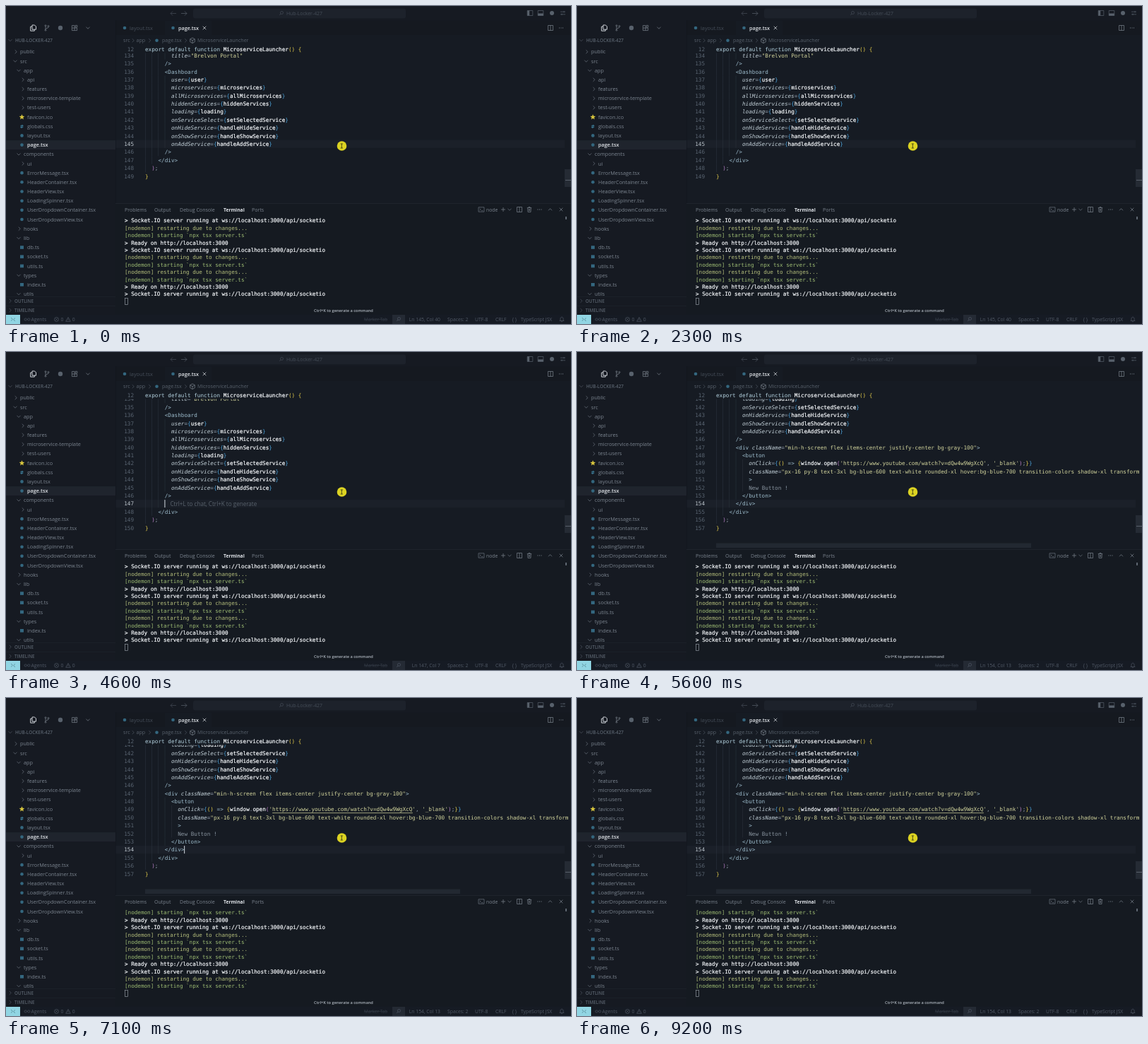
These frames come from a looping animation (800x450 px, 9300 ms). An HTML page:

```html
<!DOCTYPE html>
<html lang="en">
<head>
<meta charset="utf-8">
<title>Code editor</title>
<style>
  html, body { margin: 0; width: 100%; height: 100%; overflow: hidden; background: #161b23; }
  svg { display: block; width: 100vw; height: 100vh; }
  text { white-space: pre; font-family: "Open Sans", "Noto Sans", sans-serif; }
  .mono { font-family: "DejaVu Sans Mono", "Liberation Mono", monospace; }
  .firm { stroke: currentColor; stroke-width: .22px; }
</style>
</head>
<body>
<svg id="stage" viewBox="0 0 800 450" xmlns="http://www.w3.org/2000/svg">
  <defs><clipPath id="codeArea"><path d="M155 66.5H800V279H155Z"/></clipPath></defs>
  <g id="back"></g>
  <g id="code" clip-path="url(#codeArea)"></g>
  <g id="term"></g>
  <rect id="link" y="162.4" height=".7" fill="#d3d59d"/>
  <rect id="caret" width="1" height="11" fill="#d5dbe2"/>
  <g id="front"></g>
  <text id="position" x="615" y="446" text-anchor="end" font-size="6.8" fill="#515966"></text>
</svg>
<script>
const LOOP = 9300, MOVE = 4300, ENTER = 4400, PASTE = 4700;
const LINK = 5800, RESTART = 5900, START = 6100;
const PITCH = 4.62, CODE_X = 197, CODE_SIZE = PITCH / 0.602;
const FAINT = '#454d58', DIM = '#58616c', MID = '#7b848f', LIGHT = '#e0e4e9', BLUE = '#34677f';

const $ = id => document.getElementById(id);
const esc = s => s.replace(/&/g, '&amp;').replace(/</g, '&lt;').replace(/>/g, '&gt;');
const rect = (x, y, w, h, fill, extra = '') =>
  `<rect x="${x}" y="${y}" width="${w}" height="${h}" fill="${fill}" ${extra}/>`;
// y is the middle of the capitals
const label = (x, y, s, fill = MID, size = 7.3, extra = '') =>
  `<text x="${x}" y="${y + size * 0.357}" font-size="${size}" fill="${fill}" ${extra}>${esc(s)}</text>`;
const icon = (x, y, d, color = MID, width = 0.7) =>
  `<path transform="translate(${x} ${y})" d="${d}" fill="none" stroke="${color}" stroke-width="${width}"/>`;
const dot = (x, y, color = BLUE, r = 2.3) => `<circle cx="${x}" cy="${y}" r="${r}" fill="${color}"/>`;

const ICON = {
  right: 'M-1.3-2.5L1.3 0L-1.3 2.5',
  down: 'M-2.5-1.3L0 1.3L2.5-1.3',
  up: 'M-2.5 1.3L0-1.3L2.5 1.3',
  back: 'M4 0H-4M-1-3L-4 0L-1 3',
  forth: 'M-4 0H4M1-3L4 0L1 3',
  close: 'M-2.3-2.3L2.3 2.3M2.3-2.3L-2.3 2.3',
  plus: 'M-3 0H3M0-3V3',
  split: 'M-3.5-3.5H3.5V3.5H-3.5ZM0-3.5V3.5',
  panel: 'M-3.8-3.5H3.8V3.5H-3.8Z',
  search: 'M2.5-1A2 2 0 1 1-1.5-1A2 2 0 1 1 2.5-1M-.9.4L-2.8 2.5',
  cube: 'M0-3.8L3.3-2V2L0 3.8L-3.3 2V-2ZM-3.3-2L0 0L3.3-2M0 0V3.8',
  more: 'M-3 0H-2M-.5 0H.5M2 0H3'
};

function files() {
  // depth, kind, name; kinds: c closed, o open, x component, t script, s star, h style sheet
  const tree = `0c public|0o src|1o app|2c api|2c features|2c microservice-template|2c test-users|2s favicon.ico
2h globals.css|2x layout.tsx|2x page.tsx|1o components|2c ui|2x ErrorMessage.tsx|2x HeaderContainer.tsx
2x HeaderView.tsx|2x LoadingSpinner.tsx|2x UserDropdownContainer.tsx|2x UserDropdownView.tsx|1c hooks|1o lib
2t db.ts|2t socket.ts|2t utils.ts|1o types|2t index.ts|1o utils`.split(/[|\n]/);
  return tree.map((row, i) => {
    const depth = +row[0], kind = row[1], name = row.slice(3), y = 64.8 + i * 13.18;
    const x = 20 + depth * 5, active = name === 'page.tsx';
    const mark = {
      c: () => icon(x - 6, y, ICON.right, MID, 0.6),
      o: () => icon(x - 7, y, ICON.down, MID, 0.6),
      x: () => dot(22.5, y),
      t: () => rect(20, y - 2.3, 5, 4.6, BLUE),
      s: () => `<path transform="translate(22.5 ${y})" fill="#d7c53e" d="M0-3.8L1.1-1.2L3.8-1L1.7.8L2.4 3.5L0 2L-2.4 3.5L-1.7.8L-3.8-1L-1.1-1.2Z"/>`,
      h: () => label(20, y, '#', '#4590b0', 7.5, 'font-weight="600"')
    }[kind]();
    return (active ? rect(0, y - 6.5, 155, 13, '#1f242d') : '') + mark +
      label(x, y, name, active ? LIGHT : MID, 7.3, active ? 'font-weight="600"' : '');
  }).join('');
}

function background() {
  return rect(0, 0, 800, 450, '#161b23') +
    rect(0, 0, 800, 20.5, '#161a22') + rect(0, 20.5, 155, 417, '#161a22') +
    rect(155, 20.5, 645, 20.5, '#151920') + rect(225, 20.5, 66, 20.5, '#161b23') +
    rect(155, 20.5, 0.6, 417, '#11151b') + rect(155, 279, 645, 158, '#151a21') +
    rect(155, 279, 645, 0.6, '#252b34') + rect(0, 437, 800, 13, '#161b24');
}

function titleBar() {
  return icon(237, 10.5, ICON.back, FAINT) + icon(252, 10.5, ICON.forth, DIM) +
    rect(265, 3.5, 301, 14, '#1d222b', 'rx="3"') + icon(390, 10.5, ICON.search, FAINT) +
    label(397, 10.7, 'Hub-Locker-427', FAINT, 6.9) +
    icon(742, 10, ICON.panel, DIM) + rect(738.2, 6.5, 3, 7, DIM) +
    icon(757, 10, ICON.panel, DIM) + rect(753.2, 10.5, 7.6, 3, DIM) +
    dot(773, 10, DIM, 3) +
    icon(788.5, 10, 'M-3.5-1.8H3.5M-3.5 1.8H3.5M1.5-3V-.6M-1.5.6V3', DIM);
}

function tabs() {
  const crumb = (x, s) => label(x, 48.8, s, DIM, 7.1);
  const sep = x => icon(x, 48.8, ICON.right, DIM, 0.6);
  return icon(38.5, 31, 'M-1.5-4H2L4-2V2.2H-1.5ZM-1.5-1.8H-3.8V4.2H1.8V2.2', LIGHT, 0.9) +
    icon(58, 31, 'M-2-2V2.5M-2 1.5C-2 0 2 1 2-1.2M-3-3.2A1 1 0 1 0-1-3.2A1 1 0 1 0-3-3.2M1-2.4A1 1 0 1 0 3-2.4A1 1 0 1 0 1-2.4M-3 3.2A1 1 0 1 0-1 3.2A1 1 0 1 0-3 3.2') +
    dot(77, 31, DIM, 3.2) +
    icon(97, 31, 'M-3.6-3.4H0V3.6H-3.6ZM-3.6.1H3.6V3.6H0M1.2-3.6H3.8V-1H1.2Z') +
    icon(116, 31, ICON.down) +
    dot(168, 31) + label(175, 31.2, 'layout.tsx', FAINT) +
    dot(236.5, 31) + label(244, 31.2, 'page.tsx', LIGHT, 7.2, 'font-weight="600"') + icon(281, 31, ICON.close, LIGHT) +
    icon(771, 31, ICON.split) + icon(786, 31, ICON.more, MID, 1) +
    crumb(166, 'src') + sep(180) + crumb(184.5, 'app') + sep(203.5) + dot(213.5, 48.8) +
    crumb(221, 'page.tsx') + sep(254.5) + icon(264, 48.8, ICON.cube) + crumb(271, 'MicroserviceLauncher') +
    icon(6, 48.5, ICON.down, DIM, 0.6) + label(13, 48.7, 'HUB-LOCKER-427', DIM, 6.4, 'font-weight="600"');
}

function sidebarFoot() {
  const section = (y, s) => rect(0, y - 6.3, 155, 0.5, '#20262f') + icon(6, y, ICON.right, DIM, 0.6) +
    label(12, y, s, DIM, 6.3, 'font-weight="600"');
  return rect(0, 411, 155, 26, '#161a22') + section(417.3, 'OUTLINE') + section(430.5, 'TIMELINE');
}

function panelBar() {
  const names = [[168, 'Problems'], [210, 'Output'], [246, 'Debug Console'], [308, 'Terminal'], [348, 'Ports']];
  const y = 288;
  return names.map(([x, s]) => s === 'Terminal'
      ? label(x, y + 0.3, s, LIGHT, 6.75, 'font-weight="700"') : label(x, y + 0.3, s, MID, 7.05)).join('') +
    icon(673, y, 'M-4-3.2H4V3.2H-4ZM-2.4-1.5L-.8 0L-2.4 1.5M0 1.7H2.4', MID, 0.6) + label(680, y + 0.3, 'node', MID, 6.8) +
    icon(704, y, ICON.plus) + icon(713, y, ICON.down, MID, 0.6) + icon(727, y, ICON.split) +
    icon(741, y, 'M-3.2-2.4H3.2M-1-2.4V-3.5H1V-2.4M-2.3-2.4L-2 3.5H2L2.3-2.4M-.7-.9V2M.7-.9V2') +
    icon(755.5, y, ICON.more, MID, 1) + icon(770.5, y, ICON.up) + icon(786, y, ICON.close) +
    rect(792, 298, 2, 4, '#5d6670') +
    label(478, 430.6, 'Ctrl+K to generate a command', '#b0b8c1', 5.7, 'text-anchor="middle" font-weight="600"');
}

function statusBar() {
  const y = 443.5, color = '#515966';
  const item = (x, s) => label(x, y, s, color, 6.8);
  return rect(0, 437, 20, 13, '#91d5e3') + icon(10, y, 'M-3-2.5L-.6-.2L-3 2.1M3-2.1L.6.2L3 2.5', '#4c7f8c') +
    icon(30, y, 'M0 0C1.2-2 4-2 4 0S1.2 2 0 0S-4-2-4 0S-1.2 2 0 0', color) + item(35.5, 'Agents') +
    icon(71.5, y, 'M-3 0A3 3 0 1 0 3 0A3 3 0 1 0-3 0M-1.2-1.2L1.2 1.2M1.2-1.2L-1.2 1.2', color) + item(77.5, '0') +
    icon(88, y, 'M0-3L3.3 2.8H-3.3ZM0-1V1', color) + item(93.8, '0') +
    label(507, y, 'Marker Tab', '#343b46', 6.3, 'text-decoration="line-through"') +
    rect(547, 437, 18, 13, '#242a34') + icon(556, y, ICON.search, color) +
    item(625, 'Spaces: 2') + item(664, 'UTF-8') + item(693, 'CRLF') + item(716.5, '{ }') + item(729, 'TypeScript JSX') +
    icon(787, y, 'M-3 2H3L2 .6V-1C2-4-2-4-2-1V.6ZM-.8 3.2H.8', color);
}

// Colours one line of code; base is the bracket depth at its start.
function paint(text, base) {
  const pairs = ['#e0c94a', '#b67fc4', '#4aa0d8'];
  const parts = /=>|<\/?\w+|\/?>|"[^"]*"?|'[^']*'|\w+(?==)|[{}()]|\w+|\s+|./g;
  let depth = base;
  return [...text.matchAll(parts)].map(({ 0: s, index }) => {
    let color = '#94a1ae', style = '';
    if (/^[{(]/.test(s)) color = pairs[depth++ % 3];
    else if (/^[})]/.test(s)) color = pairs[(depth = Math.max(base, depth - 1)) % 3];
    else if (/^["']/.test(s)) color = '#d3d59d';
    else if (/^<|>$/.test(s)) color = '#9dbccc';
    else if (/^(export|default|function)$/.test(s)) color = '#b4d2df';
    else if (/^\w/.test(s)) {
      const attr = text[index + s.length] === '=', prose = base === 2 && depth === 2;
      color = attr ? '#c2d0d8' : prose ? '#89949f' : '#f0f3f6';
      style = attr ? 'font-style="italic"' : prose ? '' : `class="firm" color="${color}"`;
    }
    return `<tspan fill="${color}" ${style}>${esc(s)}</tspan>`;
  }).join('');
}

const mono = (x, y, inner, fill, size, extra = '') =>
  `<text class="mono" x="${x}" y="${y + size * 0.36}" font-size="${size}" fill="${fill}" ${extra}>${inner}</text>`;

function guides(y, indent) {
  let out = '';
  for (let col = 0; col < indent; col += 2) out += rect(CODE_X + col * PITCH, y - 5.7, 0.6, 11.4, '#2b323c');
  return out;
}

function codeLine(n, y, line, current) {
  const text = line.trimStart(), indent = line.length - text.length;
  const base = text === '}' || n === 12 ? 0 : text === ');' ? 1 : 2;
  return guides(y, indent) +
    mono(181, y, n, current ? '#bdc5cd' : '#596471', CODE_SIZE, 'text-anchor="end"') +
    mono(CODE_X + indent * PITCH, y, paint(text, base), LIGHT, CODE_SIZE);
}

const attrs = [['user', 'user'], ['microservices', 'microservices'], ['allMicroservices', 'allMicroservices'],
  ['hiddenServices', 'hiddenServices'], ['loading', 'loading'], ['onServiceSelect', 'setSelectedService'],
  ['onHideService', 'handleHideService'], ['onShowService', 'handleShowService'], ['onAddService', 'handleAddService']];
const head = ['        title="Brelvon Portal"', '      />', '      <Dashboard',
  ...attrs.map(([a, v]) => `        ${a}={${v}}`), '      />'];
const tail = ['    </div>', '  );', '}'];
const pasted = `      <div className="min-h-screen flex items-center justify-center bg-gray-100">
        <button
          onClick={() => {window.open('https://www.youtube.com/watch?v=dQw4w9WgXcQ', '_blank');}}
          className="px-16 py-8 text-3xl bg-blue-600 text-white rounded-xl hover:bg-blue-700 transition-colors shadow-xl transform
          >
          New Button !
        </button>
      </div>`.split('\n');

// top: y of line 135
const views = [
  { at: 0, extra: [], top: 81.4, line: 145, col: 40 },
  { at: MOVE, extra: [], top: 81.4, line: 146, col: 9 },
  { at: ENTER, extra: ['      '], top: 78, line: 147, col: 7 },
  { at: PASTE, extra: pasted, top: 78 - 7 * 11.385, line: 154, col: 13 }
];
const lineY = (view, n) => view.top + (n - 135) * 11.385;

function drawCode(view) {
  const y = lineY(view, view.line);
  let out = rect(155.6, y - 5.6, 635.4, 11.2, '#1b2029');
  [...head, ...view.extra, ...tail].forEach((line, i) => {
    const n = 134 + i, ly = lineY(view, n);
    if (ly > 58) out += codeLine(n, ly, line, n === view.line);
  });
  if (view.at === ENTER) out += label(232.5, y + 0.5, 'Ctrl+L to chat, Ctrl+K to generate', '#59626d', 8.1);
  if (view.at === PASTE) out += rect(197, 270.5, 446, 6.5, '#222831');
  $('code').innerHTML = out;
  $('position').textContent = `Ln ${view.line}, Col ${view.col}`;
  $('caret').setAttribute('x', CODE_X + (view.col - 1) * PITCH - 0.3);
  $('caret').setAttribute('y', y - 5.5);
}

const LOG = {
  S: ['> Socket.IO server running at ws://localhost:3000/api/socketio', '#eef1f4'],
  R: ['> Ready on http://localhost:3000', '#eef1f4'],
  c: ['[nodemon] restarting due to changes...', '#b5bf7c'],
  s: ['[nodemon] starting `npx tsx server.ts`', '#9fbe74']
};

function drawTerminal(added) {
  const rows = 'ScsRScscsRScs'.slice(added, added + 11);
  $('term').innerHTML = [...rows].map((key, i) => {
    const [text, color] = LOG[key];
    const weight = text[0] === '>' ? `style="color:${color};stroke:${color};stroke-width:.22px"` : '';
    return mono(168, 303.5 + i * 10.42, esc(text), color, 4.585 / 0.602, weight);
  }).join('') + rect(168.5, 413.5, 4, 9, 'none', 'stroke="#8d949d" stroke-width=".7"');
}

$('back').innerHTML = background() + titleBar() + tabs() + files() + sidebarFoot() + panelBar() + statusBar() +
  codeLine(12, 61, 'export default function MicroserviceLauncher() {', false);
$('front').innerHTML = rect(791, 231, 9, 25, '#252b34') + rect(792, 246, 8, 1, '#59616b') +
  dot(475.5, 198, '#dcd322', 6.8) + icon(475.3, 198, 'M-1.6-3H1.6M0-3V3M-1.6 3H1.6', '#3b3a14', 0.9);
$('link').setAttribute('x', CODE_X + 39 * PITCH);
$('link').setAttribute('width', 43 * PITCH);

function caretOn(t) {
  if (t < MOVE) return (t + 600) % 1000 < 500;
  return t < PASTE || (t + 300) % 1000 < 500;
}

let shownView, shownRows;
function render(t) {
  const view = views.filter(v => t >= v.at).pop();
  const added = (t >= RESTART) + (t >= START);
  if (view !== shownView) drawCode(shownView = view);
  if (added !== shownRows) drawTerminal(shownRows = added);
  $('link').style.display = t >= LINK ? '' : 'none';
  $('caret').style.display = caretOn(t) ? '' : 'none';
}

let begin;
function tick(now) {
  begin ??= now;
  render((now - begin) % LOOP);
  requestAnimationFrame(tick);
}
render(0);
requestAnimationFrame(tick);
</script>
</body>
</html>
```
